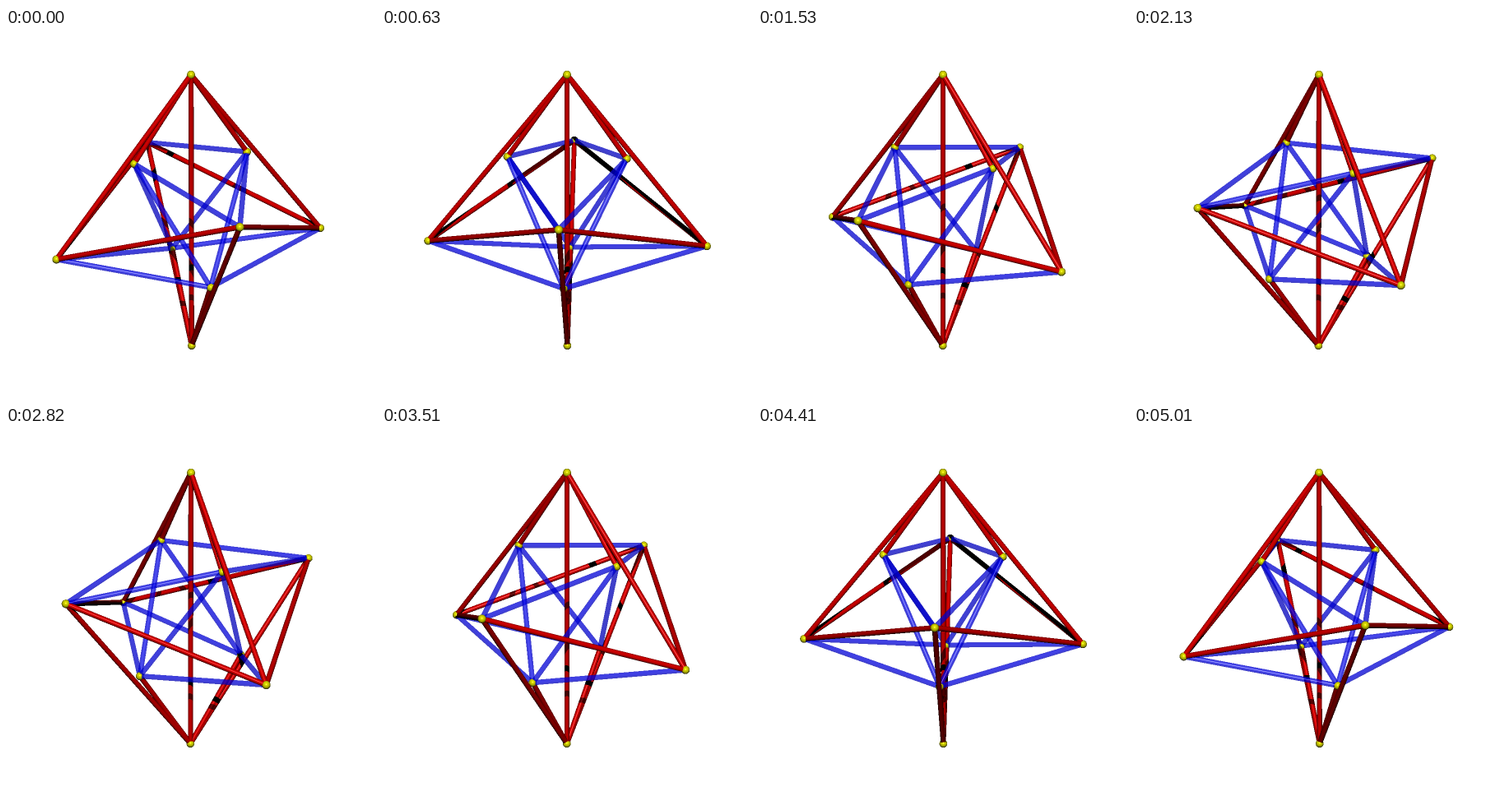
Write an HTML page with a canvas that moves like this. It is 450x450 px and loops after 5.04 s.

```html
<!DOCTYPE html>
<html lang="en">
<head>
<meta charset="utf-8">
<title>Turning polyhedron</title>
<style>
html, body { margin: 0; width: 100%; height: 100%; overflow: hidden; background: #fff; }
canvas { display: block; width: 450px; height: 450px; }
</style>
</head>
<body>
<canvas id="stage" width="450" height="450"></canvas>
<script>
const SIZE = 450, SS = 2, W = SIZE * SS;
const STEP = 30, STEPS = 168;
const RAD = Math.PI / 180;
const BAR = 3.1, BALL = 4.9;
const PERSP = 0.00038;
const TILT = 19.3 * RAD, CT = Math.cos(TILT), ST = Math.sin(TILT);

// light and half vectors in camera space (x right, y up, z to the viewer)
const LY = Math.sin(15.1 * RAD), LZ = Math.cos(15.1 * RAD);
const HY = Math.sin(7.55 * RAD), HZ = Math.cos(7.55 * RAD);

// vertex: distance from the axis, angle, height
const VERTS = {
  T: [0, 0, 174.2], B: [1.2, 25, -174.2],
  D: [170.6, 0, 39.4], E: [170.6, 180, 39.4],
  A: [170.6, -90, -39.4], C: [170.6, 90, -39.4],
  F: [72, -90, 70.6], G: [72, 90, 70.6],
  I: [72, 0, -70.6], H: [72, 180, -70.6]
};
const RED = "TB TA TC TF TG BD BE BH BI AD DC CE EA".split(" ");
const BLUE = "FD FE GD GE HA HC IA IC FH FI GH GI".split(" ");

const ctx = document.getElementById("stage").getContext("2d");
const big = document.createElement("canvas");
big.width = big.height = W;
const bigCtx = big.getContext("2d");
const img = bigCtx.createImageData(W, W);
const pix = img.data;
const depth = new Float32Array(W * W);

function place([r, deg, h], turn) {
  const a = (deg + turn) * RAD;
  const x = r * Math.sin(a), out = r * Math.cos(a);
  const y = h * CT - out * ST, z = out * CT + h * ST;
  const k = 1 / (1 - PERSP * z);
  return {
    x, y, z, k,
    sx: (SIZE / 2 + x * k) * SS, sy: (SIZE / 2 - y * k) * SS,
    lx: x, ly: y * LZ - z * LY, lz: y * LY + z * LZ
  };
}

function makeBar(name, pts, clear) {
  return { p: pts[name[0]], q: pts[name[1]], clear };
}

// bars whose shadow may fall on the box spanned by two points
function castersNear(p, q, pad, bars, self) {
  const apart = (b, c) =>
    Math.max(b.p[c], b.q[c]) + pad < Math.min(p[c], q[c]) ||
    Math.min(b.p[c], b.q[c]) - pad > Math.max(p[c], q[c]);
  return bars.filter(b => b !== self && !apart(b, "lx") && !apart(b, "ly"));
}

function lightAt(x, y, z, casters) {
  const ly = y * LZ - z * LY, lz = y * LY + z * LZ;
  let f = 1;
  for (const { p, q, clear } of casters) {
    const dx = q.lx - p.lx, dy = q.ly - p.ly;
    let t = ((x - p.lx) * dx + (ly - p.ly) * dy) / (dx * dx + dy * dy + 1e-9);
    t = t < 0 ? 0 : t > 1 ? 1 : t;
    const ex = x - p.lx - t * dx, ey = ly - p.ly - t * dy;
    if (ex * ex + ey * ey > BAR * BAR) continue;
    if (p.lz + t * (q.lz - p.lz) < lz + 2) continue;
    if (!clear) return 0;
    f *= 0.4;
  }
  return f;
}

function solid(i, z, nx, ny, nz, r, g, x, y, casters) {
  if (z <= depth[i]) return;
  depth[i] = z;
  const dot = ny * LY + nz * LZ;
  let diff = 0, spec = 0;
  if (dot > 0) {
    const f = lightAt(x, y, z, casters);
    diff = Math.pow(dot, 0.8) * f;
    spec = 140 * Math.pow(Math.max(0, ny * HY + nz * HZ), 150) * f;
  }
  const o = i * 4;
  pix[o] = r * diff + spec;
  pix[o + 1] = g * diff + spec;
  pix[o + 2] = spec;
}

function glass(i, z, ny, nz) {
  if (z <= depth[i]) return;
  const diff = Math.max(0, ny * LY + nz * LZ);
  const spec = 130 * Math.pow(Math.max(0, ny * HY + nz * HZ), 150);
  const o = i * 4;
  pix[o] = pix[o] * 0.25 + spec;
  pix[o + 1] = pix[o + 1] * 0.25 + spec;
  pix[o + 2] = pix[o + 2] * 0.25 + 0.75 * 222 * (0.75 + 0.25 * diff) + spec;
}

function drawBar(bar, bars) {
  const { p, q, clear } = bar;
  const dx = q.sx - p.sx, dy = q.sy - p.sy, len = Math.hypot(dx, dy);
  const ax = q.x - p.x, ay = q.y - p.y, az = q.z - p.z, al = Math.hypot(ax, ay, az);
  const e1x = dy / len, e1y = dx / len;
  let fx = -az * e1y, fy = az * e1x, fz = ax * e1y - ay * e1x;
  fx /= al; fy /= al; fz /= al;
  const casters = clear ? null : castersNear(p, q, 2 * BAR, bars, bar);
  const steep = Math.abs(dy) > Math.abs(dx);
  const m0 = steep ? p.sy : p.sx, n0 = steep ? p.sx : p.sy;
  const dm = steep ? dy : dx, dn = steep ? dx : dy;
  const half = BAR * SS * 1.1 * len / Math.abs(dm) + 1;
  const pad = BAR * SS + 1;
  const from = Math.floor(Math.min(m0, m0 + dm) - pad);
  const to = Math.ceil(Math.max(m0, m0 + dm) + pad);
  for (let m = from; m <= to; m++) {
    const mid = n0 + (m + 0.5 - m0) * dn / dm;
    for (let n = Math.floor(mid - half); n <= mid + half; n++) {
      const px = steep ? n : m, py = steep ? m : n;
      if (px < 0 || py < 0 || px >= W || py >= W) continue;
      const rx = px + 0.5 - p.sx, ry = py + 0.5 - p.sy;
      const t = (rx * dx + ry * dy) / (len * len);
      if (t < 0 || t > 1) continue;
      const k = p.k + (q.k - p.k) * t;
      const s = (rx * dy - ry * dx) / (len * BAR * SS * k);
      if (s * s >= 1) continue;
      const c = Math.sqrt(1 - s * s), u = t * q.k / k;
      const nx = s * e1x + c * fx, ny = s * e1y + c * fy, nz = c * fz;
      const z = p.z + az * u + BAR * nz, i = py * W + px;
      if (clear) glass(i, z, ny, nz);
      else solid(i, z, nx, ny, nz, 212, 0,
        p.x + ax * u + BAR * nx, p.y + ay * u + BAR * ny, casters);
    }
  }
}

function drawBall(v, bars) {
  const r = BALL * SS * v.k;
  const casters = castersNear(v, v, BALL + BAR, bars);
  for (let py = Math.floor(v.sy - r); py <= v.sy + r; py++) {
    for (let px = Math.floor(v.sx - r); px <= v.sx + r; px++) {
      const nx = (px + 0.5 - v.sx) / r, ny = (v.sy - py - 0.5) / r;
      const d = nx * nx + ny * ny;
      if (d >= 1) continue;
      const nz = Math.sqrt(1 - d);
      solid(py * W + px, v.z + BALL * nz, nx, ny, nz, 225, 225,
        v.x + BALL * nx, v.y + BALL * ny, casters);
    }
  }
}

function render(step) {
  const turn = 19.05 - 90 / 85 * Math.min(step, STEPS - step);
  const pts = {};
  for (const name in VERTS) pts[name] = place(VERTS[name], turn);
  const red = RED.map(n => makeBar(n, pts, false));
  const blue = BLUE.map(n => makeBar(n, pts, true));
  const bars = red.concat(blue);
  pix.fill(255);
  depth.fill(-1e6);
  for (const b of red) drawBar(b, bars);
  for (const name in pts) drawBall(pts[name], bars);
  for (const b of blue) drawBar(b, bars);
  bigCtx.putImageData(img, 0, 0);
  ctx.drawImage(big, 0, 0, SIZE, SIZE);
}

const start = performance.now();
let shown = -1;
function tick() {
  const step = Math.floor((performance.now() - start) / STEP) % STEPS;
  if (step !== shown) render(shown = step);
  requestAnimationFrame(tick);
}
tick();
</script>
</body>
</html>
```
